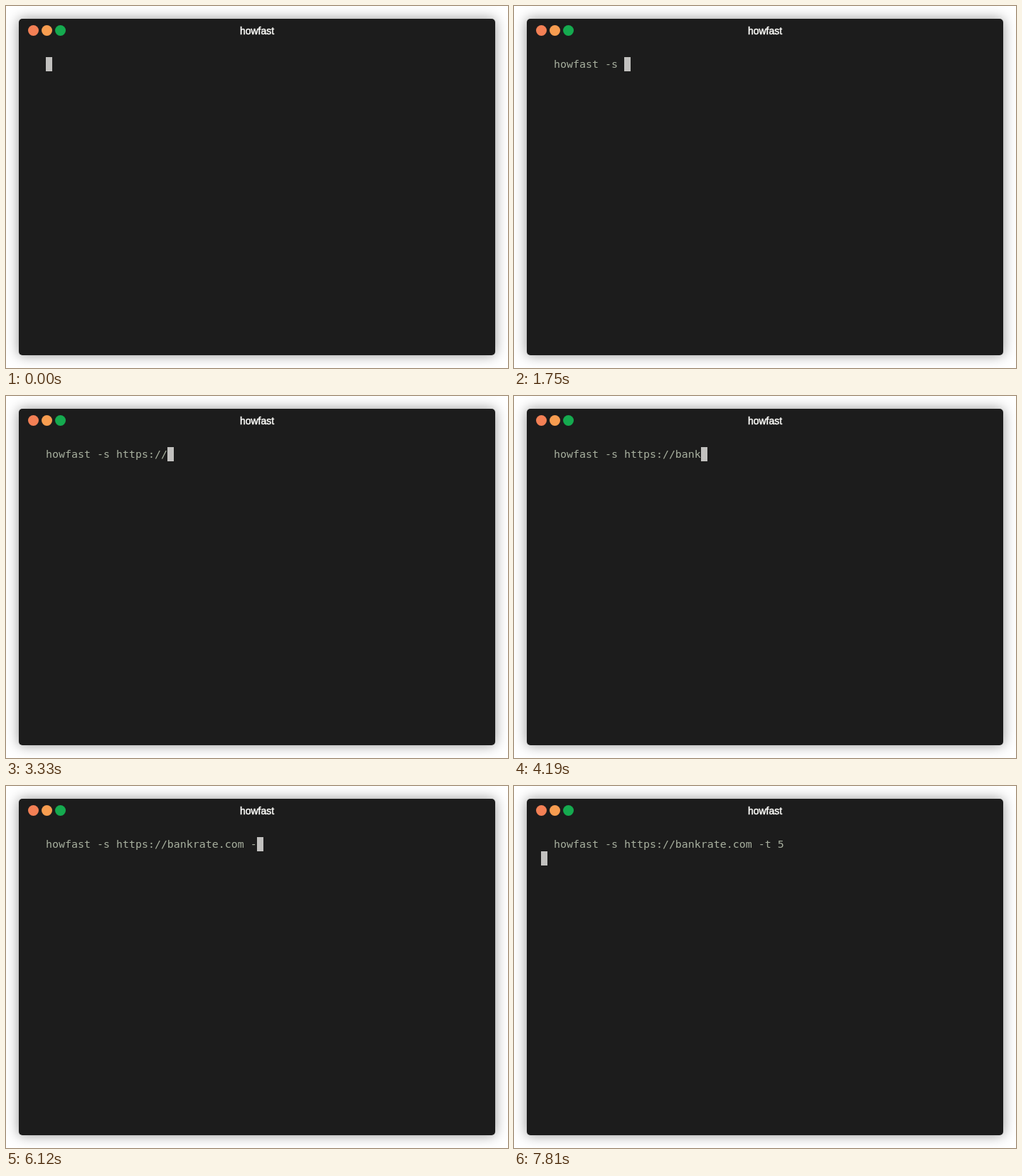
Recreate the animation shown at these times as an HTML page with a canvas. Size 706 px wide and 510 px high, loop 8 s.

```html
<!DOCTYPE html>
<html lang="en">
<head>
<meta charset="utf-8">
<title>howfast</title>
<style>
  html, body { margin: 0; width: 100%; height: 100%; overflow: hidden; background: #fff; }
  canvas { display: block; }
</style>
</head>
<body>
<canvas width="706" height="510"></canvas>
<script>
const ctx = document.querySelector('canvas').getContext('2d');
const LOOP = 8000, CELL = 9, LINE = 20, LEFT = 38, TOP = 72, INDENT = 2;
const MONO = '"DejaVu Sans Mono", monospace';

// Typing comes in bursts, each evenly paced from its first to its last key.
const bursts = [
  { text: 'how', from: 100, to: 460 },
  { text: 'fast -s ', from: 750, to: 1750 },
  { text: 'http', from: 1940, to: 2240 },
  { text: 's://', from: 2860, to: 3330 },
  { text: 'bankrate.com ', from: 3860, to: 5140 },
  { text: '-t 5', from: 6120, to: 6980 }
];
const RETURN_KEY = 7810;

function typedText(time) {
  return bursts.map(({ text, from, to }) => {
    const step = (to - from) / (text.length - 1);
    return text.slice(0, Math.max(0, Math.floor((time - from) / step + 1.001)));
  }).join('');
}

// Font size whose advance fills one terminal cell.
ctx.font = `100px ${MONO}`;
const monoFont = `${100 * CELL / ctx.measureText('0').width}px ${MONO}`;

function drawWindow() {
  ctx.fillStyle = '#fff';
  ctx.fillRect(0, 0, 706, 510);

  ctx.save();
  ctx.shadowColor = 'rgba(0, 0, 0, .42)';
  ctx.shadowBlur = 18;
  ctx.fillStyle = '#1c1c1c';
  ctx.beginPath();
  ctx.roundRect(18, 18, 670, 474, 5);
  ctx.fill();
  ctx.restore();

  ['#f38055', '#f79d50', '#15aa4f'].forEach((color, i) => {
    ctx.fillStyle = color;
    ctx.beginPath();
    ctx.arc(38.5 + 19 * i, 34.5, 7.5, 0, 2 * Math.PI);
    ctx.fill();
  });

  ctx.font = '14px "Liberation Sans", Arial, sans-serif';
  ctx.textAlign = 'center';
  ctx.fillStyle = ctx.strokeStyle = '#fbfbf8';
  ctx.lineWidth = .5;
  ctx.fillText('howfast', 353, 40);
  ctx.strokeText('howfast', 353, 40);
}

function drawTerminal(time) {
  const typed = typedText(time);
  const entered = time >= RETURN_KEY;

  ctx.font = monoFont;
  ctx.textAlign = 'left';
  ctx.fillStyle = '#a8b09f';
  ctx.fillText(typed, LEFT + INDENT * CELL, TOP + 15);

  const column = entered ? 0 : INDENT + typed.length;
  ctx.fillStyle = '#c2c1bf';
  ctx.fillRect(LEFT + column * CELL, TOP + (entered ? LINE : 0), CELL, LINE);
}

function frame() {
  drawWindow();
  drawTerminal(performance.now() % LOOP);
  requestAnimationFrame(frame);
}
frame();
</script>
</body>
</html>
```
